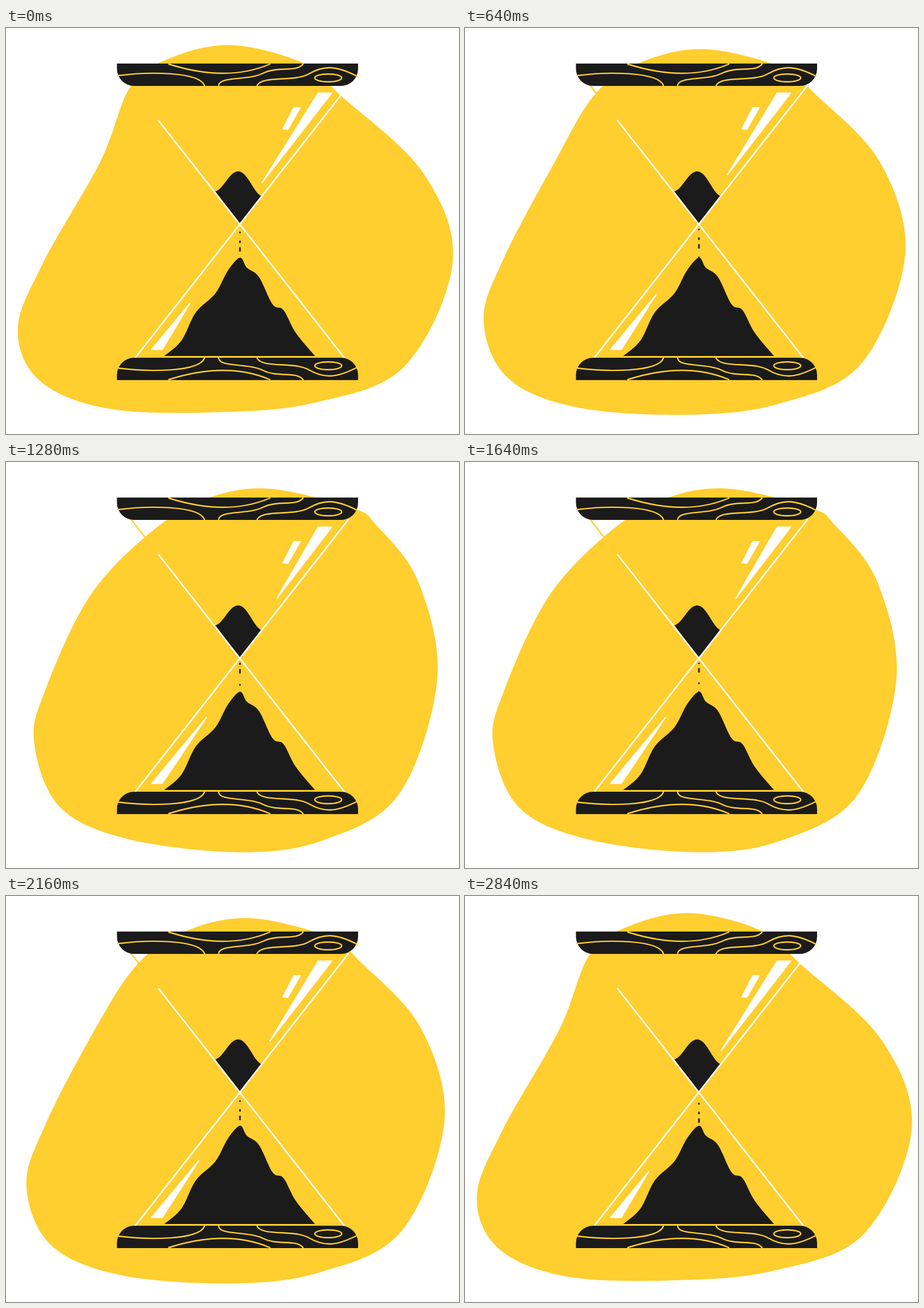
Animation of 790 by 708 pixels, one loop 2880 ms. Source, as an HTML page:

```html
<!DOCTYPE html>
<html lang="en">
<head>
<meta charset="utf-8">
<title>Hourglass</title>
<style>
  html, body { margin: 0; width: 100%; height: 100%; overflow: hidden; background: #fff; }
  svg { display: block; width: 100%; height: 100%; }
  .yellow { fill: #ffce2f; }
  .black { fill: #1b1b1b; }
  .grain { fill: none; stroke: #ffce2f; stroke-width: 2.4; stroke-linecap: round; }
  .glass { fill: none; stroke: #fff; stroke-width: 2.7; }
  .shine { fill: #fff; stroke: #fff; stroke-width: 2; stroke-linejoin: round; }
  .stream { fill: none; stroke: #1b1b1b; stroke-width: 2.8; stroke-linecap: round; }
</style>
</head>
<body>
<svg viewBox="0 0 790 708">
  <defs>
    <clipPath id="fall"><rect x="400" y="350" width="16" height="53"/></clipPath>
    <g id="board">
      <path class="black" d="M193.500 62H614V71A30 30 0 0 1 584 101H223.500A30 30 0 0 1 193.500 71Z"/>
      <g class="grain">
        <path d="M195 83C250 76 336 76 346 100"/>
        <path d="M284 63Q385 95 460 63"/>
        <path d="M371 100C372 84 422 92 448 79S506 78 518 63"/>
        <path d="M438 100C448 82 502 95 528 80S575 65 612 84"/>
        <ellipse cx="562" cy="87" rx="23.5" ry="6.800"/>
      </g>
    </g>
  </defs>

  <path id="blob" class="yellow"/>

  <path class="black" d="M365 285C380 281 389 250 405 250S431 286 445 293L408 341Z"/>
  <path id="heap" class="black"/>
  <g clip-path="url(#fall)"><path id="stream" class="stream"/></g>

  <path class="glass" d="M225.500 575L597.500 100M265 160L590 575"/>
  <path class="grain" d="M218 100L265 160"/>
  <path id="upperShine" class="shine"/>
  <path id="lowerShine" class="shine"/>
  <path class="shine" d="M502 139H513L491.500 176.500L483 176Z"/>

  <use href="#board"/>
  <use href="#board" transform="matrix(1 0 0 -1 0 676)"/>
</svg>
<script>
  const LOOP = 2880, SWAY = 2900, FRAME = 40, TAU = 2 * Math.PI;
  const setPath = (id, d) => document.getElementById(id).setAttribute("d", d);
  const parse = text => text.trim().split(/\s+/).map(pair => pair.split(",").map(Number));
  const lerp = (a, b, t) => a + (b - a) * t;

  // Catmull-Rom curve through the points.
  function smooth(points, closed) {
    const count = points.length;
    const at = i => points[closed ? (i + count) % count : Math.min(Math.max(i, 0), count - 1)];
    const handle = (i, side) => at(i).map((v, axis) =>
      v + side * (at(i + 1)[axis] - at(i - 1)[axis]) / 6);
    let d = `M${at(0)}`;
    for (let i = 0; i < count - (closed ? 0 : 1); i++)
      d += `C${handle(i, 1)} ${handle(i + 1, -1)} ${at(i + 1)}`;
    return d + "Z";
  }

  // Key points of the blob at both ends of its sway.
  const wide = parse(`396,30 520,62 584,118 727,252 779,408 695,590 540,653 370,670
    180,664 60,616 20.5,526 64,411 165,232 218,101 290,51`);
  const round = parse(`458,47 606,81 648,110 719,208 751,379 685,579 556,659 412,681
    217,658 96,602 50,488 70,394 143,238 243,132 345,67`);

  setPath("heap", smooth(parse(`276,572 306,545 331,496 365,463 387,423 408,400.5
    420,418 441,434 465,482 484,492 505,531 539,572`)));

  // Sand leaves the neck in bursts: a dot, a short dash and a longer dash.
  function streamPath(step) {
    let d = "";
    for (let n = 0; n <= 8; n++) {
      const release = 8.75 * n - 3.4 - Math.cos(TAU * (n - 1.5) / 8);
      const y = 335 + 5.6 * (step - release);
      d += `M408 ${y}v.5m0 15v2m0 9.500v5.500`;
    }
    return d;
  }

  function draw(now) {
    const time = now % LOOP;
    const mix = (1 - Math.cos(TAU * time / SWAY)) / 2;
    const blob = wide.map((from, i) => from.map((v, axis) => lerp(v, round[i][axis], mix)));

    setPath("blob", smooth(blob, true));
    setPath("upperShine", `M544.5 113.5H568L${lerp(446.7, 473.8, mix)} ${lerp(269.5, 236, mix)}Z`);
    setPath("lowerShine", `M254 560.5H272.5L${lerp(320.5, 350.8, mix)} ${lerp(480.5, 444, mix)}Z`);
    setPath("stream", streamPath(time / FRAME));
  }

  const origin = performance.now();
  function tick() {
    draw(performance.now() - origin);
    requestAnimationFrame(tick);
  }
  tick();
</script>
</body>
</html>
```
